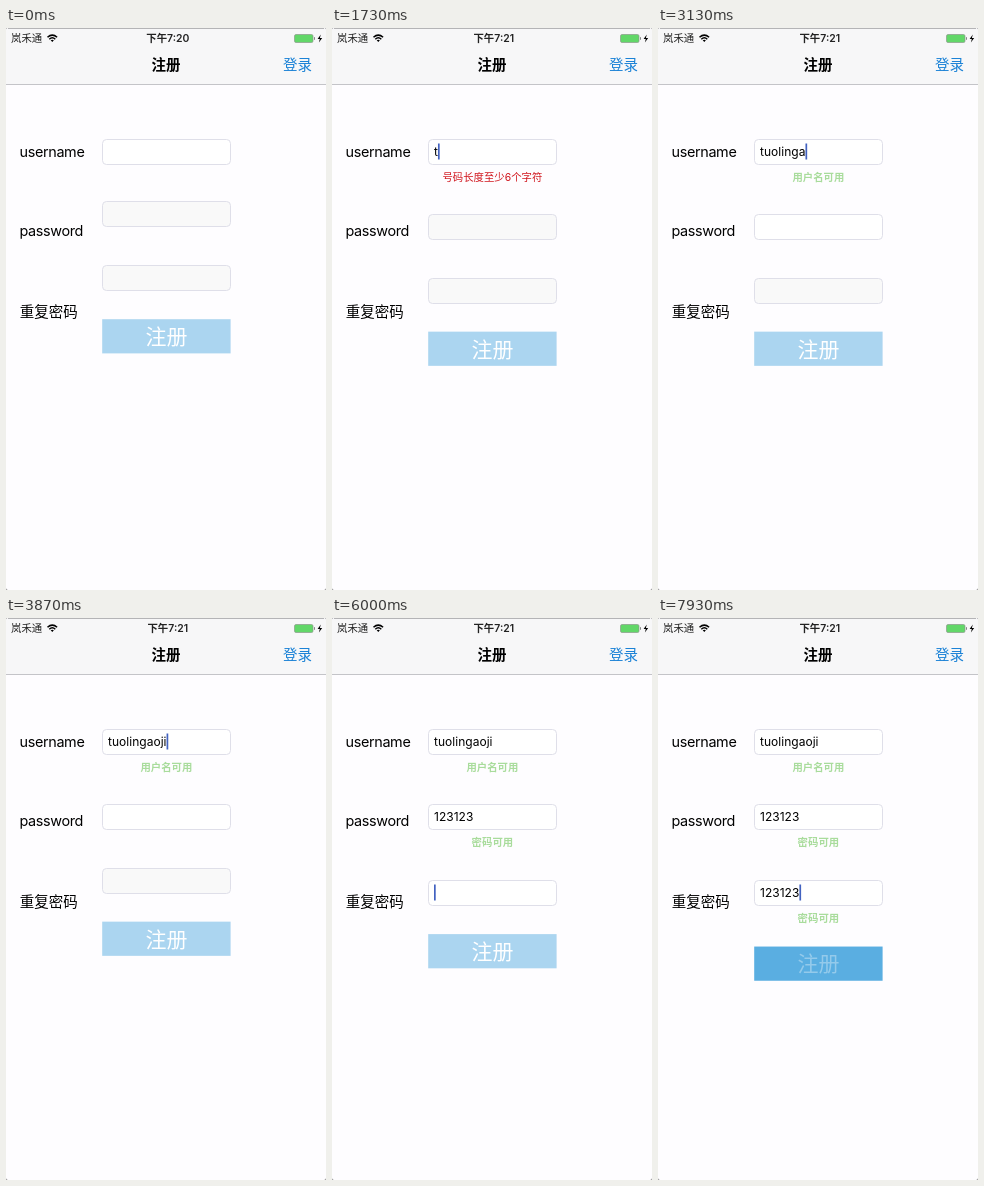
Animation, 320 px wide and 562 px high, one loop 8000 ms. Source, as an HTML page:

```html
<!DOCTYPE html>
<html lang="zh">
<head>
<meta charset="utf-8">
<style>
  html, body { margin: 0; width: 100%; height: 100%; overflow: hidden; background: #777; }
  svg { display: block; width: 100%; height: 100%; font-family: Inter, "Noto Sans CJK SC", "Noto Sans CJK", sans-serif; }
  .label { font-size: 14.4px; letter-spacing: -.35px; }
  .cjk { font-size: 14.5px; }
  .status { font-size: 10.4px; fill: #222; }
  .input { font-size: 12px; letter-spacing: .03px; }
  .note { font-size: 10.4px; text-anchor: middle; }
  .mid { text-anchor: middle; }
  .box { stroke: #dfdfe9; }
</style>
</head>
<body>
<svg id="stage" viewBox="0 0 320 562">
  <rect width="320" height="562" rx="2" fill="#fefdff"/>
  <path d="M0 56V2a2 2 0 0 1 2-2H318a2 2 0 0 1 2 2V56z" fill="#f7f7f8"/>
  <path d="M2 .5H318" stroke="#b4b4b6"/>
  <path d="M0 56.5H320" stroke="#c4c4c8"/>

  <text class="status" x="5" y="13.8">岚禾通</text>
  <g fill="none" stroke="#000" stroke-width="1.5">
    <path d="M41.5 9.3Q46.3 4.9 51.1 9.3M43.3 11.2Q46.3 8.4 49.3 11.2"/>
  </g>
  <path d="M44.7 12.3Q46.3 11 47.9 12.3L46.3 14z"/>
  <text id="clock" class="status mid" x="161.8" y="14" font-weight="600"></text>
  <rect x="288.5" y="6.5" width="18.5" height="8" rx="1.5" fill="#62d769" stroke="#8b9a8c" stroke-width=".7"/>
  <path d="M308 9h.6q.7 1.5 0 3h-.6z" fill="#777"/>
  <path d="M314.8 6.5L311.6 11h2.2l-.9 3.6 3.3-4.7h-2.3z"/>

  <text class="cjk mid" x="160" y="42.4" font-weight="700">注册</text>
  <text class="cjk" x="277" y="42.4" fill="#1b82d6">登录</text>

  <text class="label" x="13.5" y="129">username</text>
  <text class="label" x="13.5" y="207.6">password</text>
  <text class="cjk" x="13.7" y="288.6">重复密码</text>

  <g id="fields"></g>
  <rect id="caret" width="1.7" height="16" fill="#4262c0"/>
  <g id="button">
    <rect x="96.2" width="128.4" height="34.2" fill="#5aaee1"/>
    <text class="mid" x="160.4" y="24.9" font-size="21" fill="#fff">注册</text>
  </g>
</svg>
<script>
const LOOP = 8000, STEP = 12.45;
const RED = '#d0141c', GREEN = '#a9dc9c';
const $ = id => document.getElementById(id);

// start: first key, gap: time between keys, focus: caret appears
const fields = [
  { top: 111, text: 'tuolingaoji', focus: 930, start: 1600, gap: 210, bad: '号码长度至少6个字符', good: '用户名可用' },
  { top: 173.4, text: '123123', focus: 4270, start: 4420, gap: 290, bad: '密码长度至少6个字符', good: '密码可用' },
  { top: 237.3, text: '123123', focus: 5940, start: 6080, gap: 100, bad: '', good: '密码可用' }
];

function add(tag, attrs) {
  const el = document.createElementNS('http://www.w3.org/2000/svg', tag);
  for (const k in attrs) el.setAttribute(k, attrs[k]);
  return $('fields').appendChild(el);
}

for (const f of fields) {
  f.box = add('rect', { class: 'box', x: 96.5, width: 128, height: 25, rx: 4 });
  f.input = add('text', { class: 'input', x: 102 });
  f.note = add('text', { class: 'note', x: 160.4 });
}

function draw(t) {
  let notes = 0, enabled = true, active = null;
  for (const f of fields) {
    const y = Math.round(f.top + notes * STEP);
    const count = t < f.start ? 0 : Math.min(f.text.length, 1 + Math.floor((t - f.start) / f.gap));
    const valid = count >= 6;
    const message = valid ? f.good : count ? f.bad : '';

    f.box.setAttribute('y', y + .5);
    f.box.setAttribute('fill', enabled ? '#fff' : '#f9f9f9');
    f.input.setAttribute('y', y + 17);
    f.input.textContent = f.text.slice(0, count);
    f.note.setAttribute('y', y + 42.4);
    f.note.setAttribute('fill', valid ? GREEN : RED);
    f.note.setAttribute('font-weight', valid ? 600 : 400);
    f.note.textContent = message;

    if (t >= f.focus) active = { f, y, count };
    if (message) notes++;
    enabled = enabled && valid;
  }

  $('caret').setAttribute('visibility', active ? 'visible' : 'hidden');
  if (active) {
    const width = active.count ? active.f.input.getComputedTextLength() : 0;
    $('caret').setAttribute('x', 102 + width);
    $('caret').setAttribute('y', active.y + 4.5);
  }

  const [face, title] = $('button').children;
  $('button').setAttribute('transform', `translate(0 ${291.2 + notes * STEP})`);
  face.setAttribute('opacity', enabled ? 1 : .5);
  title.setAttribute('opacity', t < 7870 ? 1 : .35);
  $('clock').textContent = t < 1270 ? '下午7:20' : '下午7:21';
}

function tick() {
  draw(performance.now() % LOOP);
  requestAnimationFrame(tick);
}
tick();
</script>
</body>
</html>
```
